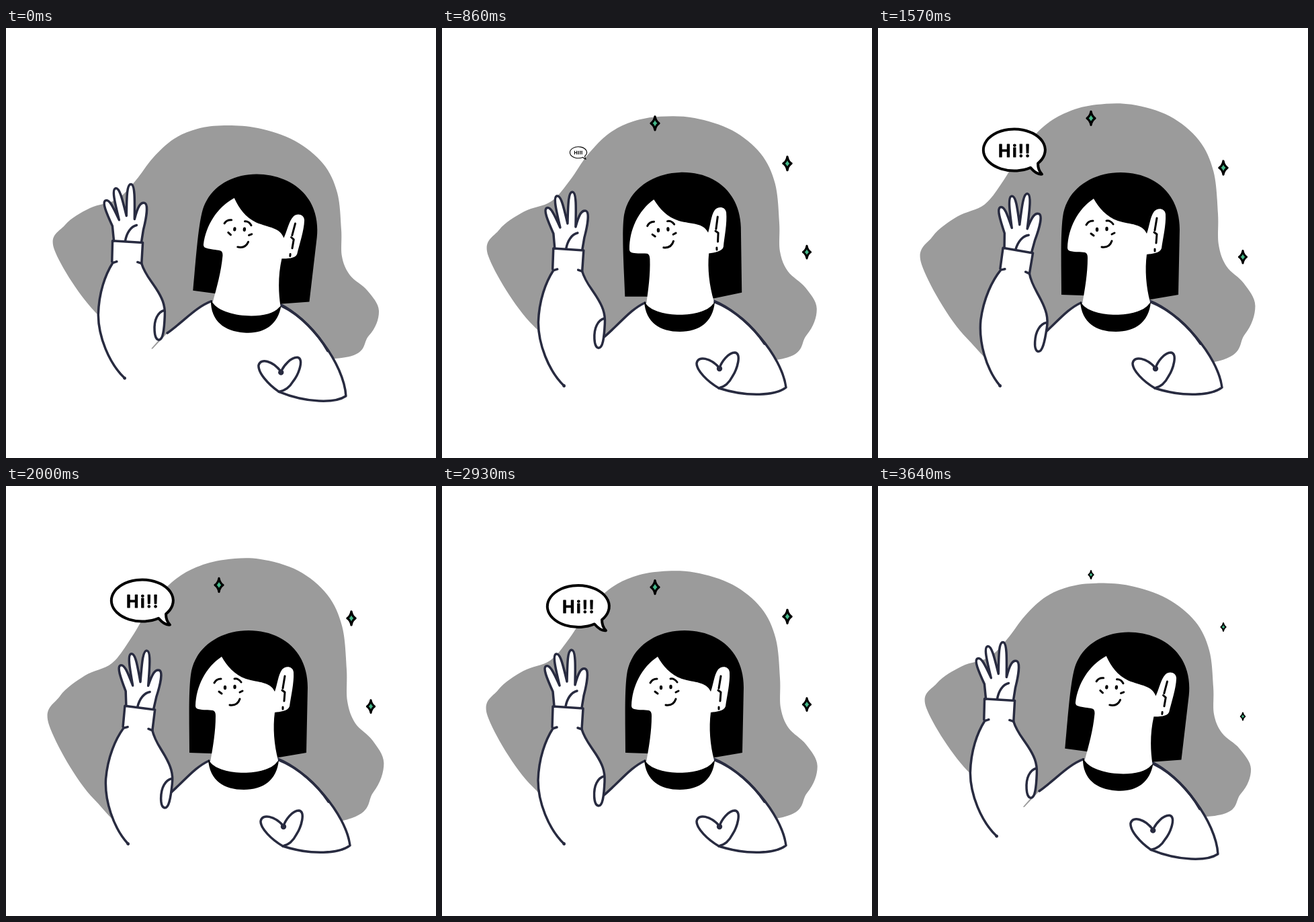
Write an HTML page that moves like this. It is 640x640 px and loops after 3.71 s.

```html
<!DOCTYPE html>
<html lang="en">
<head>
<meta charset="utf-8">
<title>Waving hello</title>
<style>
  html, body { margin: 0; width: 100%; height: 100%; overflow: hidden; background: #fff; }
  svg { display: block; width: 100%; height: 100%; }
  .line, .ink { fill: none; stroke-linecap: round; stroke-linejoin: round; }
  .line { stroke: #282b40; stroke-width: 3.5; }
  .ink { stroke: #000; stroke-width: 3; }
  .white { fill: #fff; }
  .dot { fill: #282b40; }
  .hi { font: 500 26px Roboto, sans-serif; letter-spacing: 2.6px; stroke: #000; stroke-width: 1.2; stroke-linejoin: round; }
  .star { fill: #45b88a; stroke: #000; stroke-width: 3.3; stroke-linejoin: round; }
</style>
</head>
<body>
<svg viewBox="0 0 640 640">
  <path id="blob" fill="#9b9b9b"/>

  <g id="body">
    <path class="white" d="M302 409L404 406C450 424 506 488 512 535C497 547 455 550 412 536L182 533L240 461C264 441 280 420 302 409Z"/>
    <path class="line" d="M302 409C280 419 264 441 240 461"/>
    <path class="line" d="M404 406C450 424 506 488 512 535C497 547 455 550 412 536"/>
    <path class="line" d="M406 408C436 420 462 443 480 470"/>
    <path class="line" d="M412 536C395 526 379 510 379 499C381 487 400 491 413 506C416 497 426 483 436 483C446 484 440 507 432 519C427 529 421 534 412 536Z"/>
    <circle class="dot" cx="413" cy="507" r="4.2"/>

    <g id="arm">
      <path class="white" d="M182 533C158 510 143 470 143 438C144 405 154 378 165 361L165 328L210 331L208 362C230 400 243 418 242 440C241 462 239 476 233 476Z"/>
      <path id="hand" class="line" style="fill:#fff"/>
      <path class="line" d="M184 328C186 317 192 307 201 305"/>
      <path class="line" d="M164 359L165 328L210 331L208 362M171 359L165 361C154 378 144 405 143 438C143 470 158 510 182 533"/>
      <path class="line" d="M202 360L208 362C212 376 220 385 229 399C238 413 243 424 242 440C241 462 239 476 233 476C225 475 225 452 230 442C233 436 237 433 241 432"/>
      <circle class="dot" cx="181.500" cy="532.500" r="2.400"/>
    </g>
  </g>

  <g id="head">
    <path d="M273 397C273 360 271 300 276 275C284 238 320 215 361 215C410 215 449 245 449 300L447 397L400 405L303 398Z"/>
    <path class="white" d="M321 254C297 270 283 298 282 327Q282 331 286 332C294 334 301 333 308 334Q312 335 312 342C312 366 308 388 304 411C312 440 396 440 405 408C399 385 397 360 400 337C408 336 420 335 422 328C424 313 429 293 428 277C427 268 416 267 411 273C405 281 404 295 400 306C393 291 377 293 357 287C340 281 329 268 321 254Z"/>
    <path class="ink" d="M310 293C312 289 316 287 320 287M340 287C344 286 348 289 350 292M317 306L321 309M348 307L352 305M333 326C341 327 346 323 348 317"/>
    <path class="ink" d="M415 283L412 301M411 304L415 307L414 320M412 329L412 332"/>
    <ellipse cx="326" cy="300" rx="2.200" ry="3.200"/>
    <ellipse cx="340.500" cy="299" rx="2.200" ry="3.200"/>
  </g>

  <path id="collar" d="M301 407C303 439 325 452 354 452C383 452 403 438 406 408L403 411C388 432 320 432 304 411Z"/>

  <g id="bubble">
    <path class="ink" style="fill:#fff;stroke-width:4" d="M227 194.300A46 31 0 1 1 238 187.900C238 195 241 201 244 204C238 205 232 200 227 194.300Z"/>
    <text class="hi" x="179" y="178">Hi!!</text>
  </g>
  <g id="stars"></g>
</svg>

<script>
const LOOP = 3710, STEP = 70;
const { PI, cos, sin, atan2, hypot, floor } = Math;
const $ = id => document.getElementById(id);
const move = (el, value) => el.setAttribute("transform", value);
const show = (el, on) => { el.style.display = on ? "" : "none"; };

// Timing: smooth step from 0 to 1, a single hump, and a slow float.
const ease = x => (1 - cos(PI * Math.min(1, Math.max(0, x)))) / 2;
const ramp = (t, from, to) => ease((t - from) / (to - from));
const hump = (t, from, to) => ramp(t, from, (from + to) / 2) - ramp(t, (from + to) / 2, to);
const bob = (t, peak) => (1 + cos((t - peak) * 2 * PI / 2280)) / 2;

const outline = [
  [72, 330], [88, 293], [125, 268], [165, 255], [193, 227], [219, 193], [250, 165],
  [285, 150], [325, 145], [375, 149], [430, 168], [472, 202], [493, 245], [499, 300],
  [500, 340], [512, 368], [538, 391], [555, 421], [540, 458], [490, 492], [230, 480], [138, 428]
];

// The outline swells towards the upper right and the lower left.
function swell([x, y], k) {
  const a = atan2(y - 320, x - 318);
  return [x + 8 * k * cos(a), y - 42 * k * cos(a + .96)];
}

function smoothLoop(p) {
  const n = p.length, at = i => p[(i + n) % n];
  const ctrl = (a, b, c) => b.map((v, k) => v + (c[k] - a[k]) / 6);
  return `M${p[0]}` + p.map((b, i) => {
    const c = at(i + 1);
    return `C${ctrl(at(i - 1), b, c)} ${ctrl(at(i + 2), c, b)} ${c}`;
  }).join("") + "Z";
}

// A hand is a row of tips between the valleys on either side.
function handPath(valleys, tips) {
  return "M167 328L" + valleys[0] + tips.map(([x, y], i) => {
    const a = valleys[i], b = valleys[i + 1];
    const u = [x - (a[0] + b[0]) / 2, y - (a[1] + b[1]) / 2];
    const w = 6 / hypot(...u), n = [-u[1] * w, u[0] * w];
    const side = p => [p[0] + u[0] * .6, p[1] + u[1] * .6];
    return `C${side(a)} ${x - n[0]} ${y - n[1]} ${x} ${y}C${x + n[0]} ${y + n[1]} ${side(b)} ${b}`;
  }).join("") + "L208 330";
}

$("hand").setAttribute("d", handPath(
  [[165, 306], [175, 297], [186, 291], [198, 296], [211, 312]],
  [[155, 268], [170, 250], [193, 244], [213, 272]]
));

// Sparkles: place, floating distance, size and time of appearing.
const stars = [
  { x: 317, y: 132, reach: 26, size: 1, start: 540 },
  { x: 514, y: 210, reach: -22, size: 1, start: 220 },
  { x: 543, y: 343, reach: -25, size: .93, start: 250 }
].map(s => {
  const el = document.createElementNS("http://www.w3.org/2000/svg", "path");
  el.setAttribute("class", "star");
  el.setAttribute("d", "M0-10C1-4 3-2 6 0C3 2 1 4 0 10C-1 4-3 2-6 0C-3-2-1-4 0-10Z");
  $("stars").append(el);
  return { el, ...s };
});

function draw(t) {
  const k = t < 2000 ? ease(t / 2000) : ease((3750 - t) / 1750);
  $("blob").setAttribute("d", smoothLoop(outline.map(p => swell(p, k))));

  const back = ramp(t, 3100, 3640);
  const lean = 1 - ramp(t, 0, 800) + back;
  const pose = angle => `translate(${3 * lean} ${1.5 * lean}) rotate(${angle} 354 417)`;
  move($("body"), pose(4.2 * lean));
  move($("collar"), pose(4.2 * lean));
  move($("head"), pose(5.5 * lean - 3.7 * hump(t, 0, 1140)));

  const wave = -4.6 + 10.5 * ramp(t, 570, 1140) - 5.9 * ramp(t, 1500, 2500) - 4.6 * back;
  move($("arm"), `rotate(${wave} 182 533)`);

  const pop = (ramp(t, 700, 1100) - ramp(t, 3200, 3500)) * (1 + .06 * hump(t, 1000, 1300));
  move($("bubble"), `translate(203 ${188 - 20.5 * bob(t, 2250)}) scale(${pop}) translate(-203 -168)`);
  show($("bubble"), pop > .01);

  for (const { el, x, y, reach, size, start } of stars) {
    const s = size * (ramp(t, start, start + 300) - ramp(t, 3540, 3770));
    move(el, `translate(${x} ${y + reach * bob(t, 2460)}) scale(${s})`);
    show(el, s > .01);
  }
}

const begin = performance.now();
function tick() {
  const t = (performance.now() - begin) % LOOP;
  draw(floor(t / STEP) * STEP);
  requestAnimationFrame(tick);
}
tick();
</script>
</body>
</html>
```
